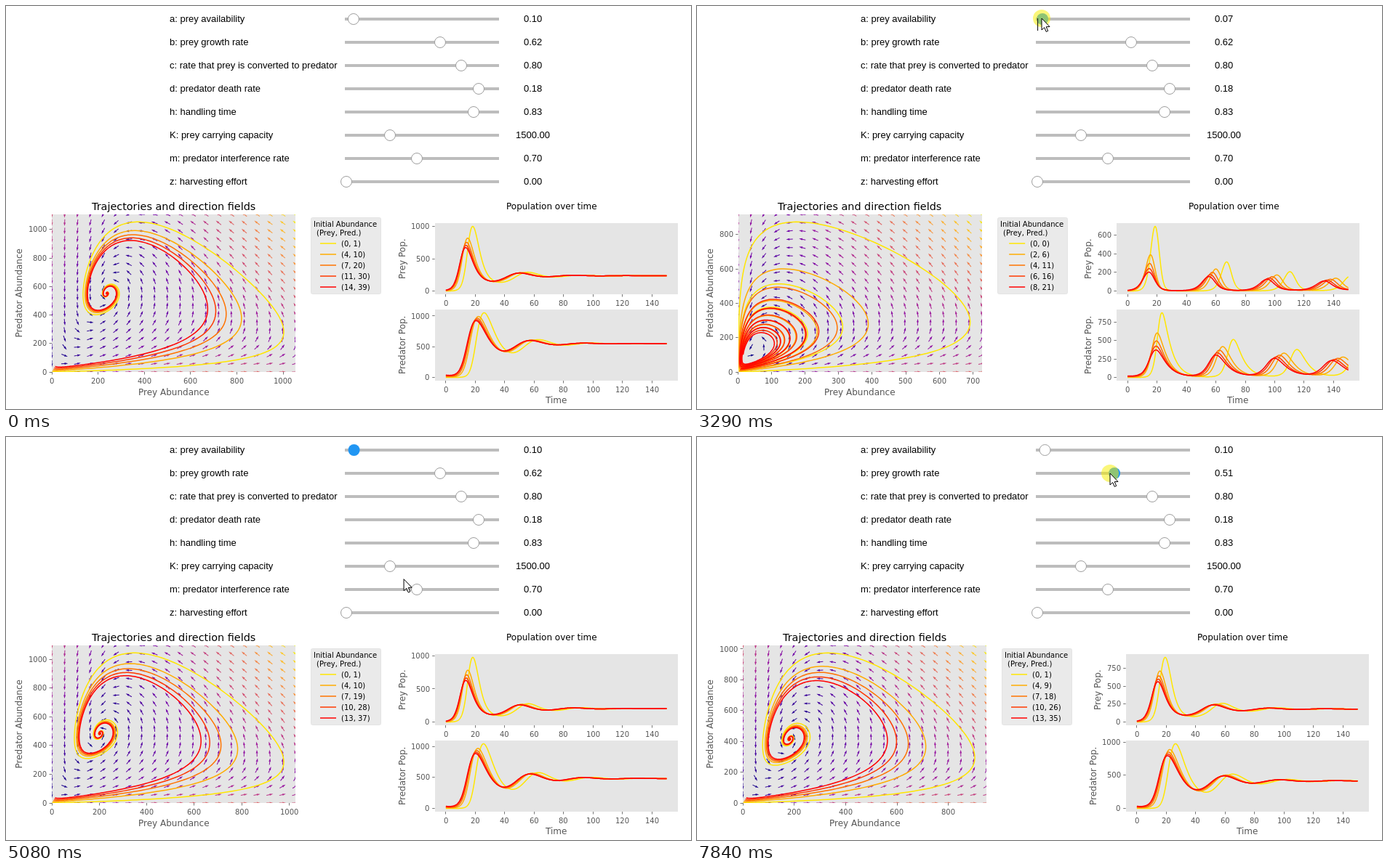
Recreate the animation shown at these times as an HTML page with a canvas. Size 942x555 px, loop 7990 ms.

```html
<!DOCTYPE html>
<html lang="en">
<head>
<meta charset="utf-8">
<title>Predator and prey</title>
<style>
html, body { margin: 0; width: 100%; height: 100%; overflow: hidden; background: #fff; }
canvas { display: block; }
</style>
</head>
<body>
<canvas id="stage" width="942" height="555"></canvas>
<script>
const ctx = document.getElementById('stage').getContext('2d');
const LOOP = 7990;
const SANS = '"DejaVu Sans", sans-serif';
const PANEL = '"Liberation Sans", Arial, sans-serif';
const GREY = '#555';
const PLASMA = ['0d0887', '46039f', '7201a8', '9c179e', 'bd3786', 'd8576b', 'ed7953', 'fb9f3a', 'fdca26', 'f0f921']
  .map(hex => [0, 2, 4].map(i => parseInt(hex.slice(i, i + 2), 16)));
const STARTS = [0.1, 1.325, 2.55, 3.775, 5];
const COLORS = [230, 172, 115, 57, 0].map(g => `rgb(255,${g},0)`);

// ---- model: logistic prey, predators that interfere with each other ----
const c = 0.8, d = 0.18, h = 0.83, K = 1500, m = 0.7;

function flow(n, p, a, b) {
  const eaten = a * n * p / (p ** m + a * h * n);
  return [b * n * (1 - n / K) - eaten, c * eaten - d * p];
}

function solve(a, b) {
  const n0 = d / (a * (c - d * h)), p0 = n0 * b * c / d, dt = 0.05;
  let nMax = 0, pMax = 0;
  const runs = STARTS.map(v => {
    let n = v * n0, p = v * p0;
    const label = `(${n.toFixed(0)}, ${p.toFixed(0)})`, pts = [];
    for (let i = 0; i <= 3000; i++) {
      if (i % 3 === 0) pts.push([i * dt, n, p]);
      nMax = Math.max(nMax, n);
      pMax = Math.max(pMax, p);
      const k1 = flow(n, p, a, b);
      const k2 = flow(n + k1[0] * dt / 2, p + k1[1] * dt / 2, a, b);
      const k3 = flow(n + k2[0] * dt / 2, p + k2[1] * dt / 2, a, b);
      const k4 = flow(n + k3[0] * dt, p + k3[1] * dt, a, b);
      n += dt / 6 * (k1[0] + 2 * k2[0] + 2 * k3[0] + k4[0]);
      p += dt / 6 * (k1[1] + 2 * k2[1] + 2 * k3[1] + k4[1]);
    }
    return { label, pts };
  });
  return { a, b, runs, nMax, pMax };
}

// from: first time of the plots; axes, curves: when the right side follows
const SCENES = [
  { from: 0, axes: 0, curves: 0, sys: solve(0.0966, 0.62) },
  { from: 1700, axes: 1950, curves: 1950, sys: solve(0.1803, 0.62) },
  { from: 4310, axes: 4510, curves: 4510, sys: solve(0.1032, 0.62) },
  { from: 6960, axes: 7010, curves: 7210, sys: solve(0.1032, 0.583) }
];

// ---- drawing helpers ----
// Text starts on whole pixels
function text(str, x, y, size, color = '#000', align = 0, font = SANS) {
  ctx.font = `${size}px ${font}`;
  ctx.fillStyle = color;
  ctx.fillText(str, Math.round(x - align * ctx.measureText(str).width), Math.round(y));
}
const CENTER = 0.5, RIGHT = 1;

function line(pts, color, width) {
  ctx.beginPath();
  pts.forEach(([x, y]) => ctx.lineTo(x, y));
  ctx.strokeStyle = color;
  ctx.lineWidth = width;
  ctx.lineJoin = 'round';
  ctx.stroke();
}

function disc(x, y, r, fill, stroke) {
  ctx.beginPath();
  ctx.arc(x, y, r, 0, 7);
  ctx.fillStyle = fill;
  ctx.fill();
  if (stroke) {
    ctx.strokeStyle = stroke;
    ctx.lineWidth = 1;
    ctx.stroke();
  }
}

function tickStep(range, bins) {
  const raw = range / bins, mag = 10 ** Math.floor(Math.log10(raw));
  return mag * [1, 2, 2.5, 5, 10].find(s => s * mag >= raw);
}

const snap = v => Math.floor(v) + 0.5;

// Draws the grey field with ticks and labels; returns the value-to-pixel maps
function axes({ x, y, w, h, xr, yr, bins, xEnd, yLabel }) {
  const px = v => x + (v - xr[0]) / (xr[1] - xr[0]) * w;
  const py = v => y + h - (v - yr[0]) / (yr[1] - yr[0]) * h;
  ctx.fillStyle = '#e5e5e5';
  ctx.fillRect(Math.round(x), y, w, h);
  const sx = tickStep(xr[1] - xr[0], 9), sy = tickStep(yr[1] - yr[0], bins);
  for (let v = 0; v <= xEnd; v += sx) {
    const tx = snap(px(v));
    line([[tx, y + h], [tx, y + h + 3.5]], GREY, 0.8);
    text(v, px(v), y + h + 15.5, 10, GREY, CENTER);
  }
  let top = 0;
  for (let v = 0; v <= yr[1]; v += sy) {
    const ty = snap(py(v));
    line([[x - 3.5, ty], [x, ty]], GREY, 0.8);
    text(v, x - 7, py(v) + 3.6, 10, GREY, RIGHT);
    top = v;
  }
  ctx.save();
  ctx.translate(Math.round(x - (top >= 1000 ? 41 : 34.6)), y + h / 2);
  ctx.rotate(-Math.PI / 2);
  text(yLabel, 0, 0, 12, GREY, CENTER);
  ctx.restore();
  return { px, py };
}

function clipped(x, y, w, h, draw) {
  ctx.save();
  ctx.beginPath();
  ctx.rect(x, y, w, h);
  ctx.clip();
  draw();
  ctx.restore();
}

function plasma(u) {
  const f = Math.min(u, 0.9999) * 9, i = Math.floor(f);
  return `rgb(${PLASMA[i].map((v, k) => Math.round(v + (PLASMA[i + 1][k] - v) * (f - i)))})`;
}

function arrow(x, y, angle, color) {
  const half = 4.65;
  ctx.save();
  ctx.translate(x, y);
  ctx.rotate(angle);
  ctx.beginPath();
  [[-half, -0.5], [half - 4.5, -0.5], [half - 5, -1.5], [half, 0],
    [half - 5, 1.5], [half - 4.5, 0.5], [-half, 0.5]].forEach(q => ctx.lineTo(...q));
  ctx.fillStyle = color;
  ctx.fill();
  ctx.restore();
}

// ---- plots ----
function phasePlot(sys, x) {
  const y = 287, w = 335, h = 217, nTop = sys.nMax * 1.05, pTop = sys.pMax * 1.05;
  const { px, py } = axes({ x, y, w, h, xr: [0, nTop], yr: [0, pTop], bins: 9, xEnd: nTop, yLabel: 'Predator Abundance' });
  clipped(Math.round(x), y, w, h, () => {
    const field = [];
    for (let i = 0; i < 20; i++) for (let j = 0; j < 20; j++) {
      if (i + j === 0) continue;
      const n = nTop * i / 19, p = pTop * j / 19, [dn, dp] = flow(n, p, sys.a, sys.b);
      field.push({ n, p, angle: Math.atan2(-dp, dn), speed: Math.hypot(dn, dp) });
    }
    const fastest = Math.max(...field.map(f => f.speed));
    field.forEach(f => arrow(px(f.n), py(f.p), f.angle, plasma(f.speed / fastest)));
    sys.runs.forEach((r, i) => line(r.pts.map(q => [px(q[1]), py(q[2])]), COLORS[i], 1.5));
  });
  text('Trajectories and direction fields', x + w / 2, 281, 14.4, '#000', CENTER);
  text('Prey Abundance', x + w / 2, 536, 12, GREY, CENTER);
}

function legend(sys, x) {
  ctx.beginPath();
  ctx.roundRect(x + 0.5, 291.5, 96, 105, 2);
  ctx.fillStyle = '#eaeaea';
  ctx.fill();
  ctx.strokeStyle = '#e0e0e0';
  ctx.lineWidth = 0.8;
  ctx.stroke();
  text('Initial Abundance', x + 4, 304, 10);
  text('(Prey, Pred.)', x + 7.5, 316, 10);
  // the entries are centred as a block
  const widest = Math.max(...sys.runs.map(r => ctx.measureText(r.label).width));
  const left = x + 47.3 - (29 + widest) / 2;
  sys.runs.forEach((r, i) => {
    const y = Math.round(327.3 + 14.8 * i);
    line([[left, y], [left + 22, y]], COLORS[i], 1.5);
    text(r.label, left + 29, y + 4, 10);
  });
}

function timePlot(sys, x, y, col, max, yLabel, curves) {
  const w = 334, h = 98;
  const { px, py } = axes({ x, y, w, h, xr: [-7.5, 157.5], yr: [-0.05 * max, 1.05 * max], bins: 4.05, xEnd: 150, yLabel });
  if (curves) clipped(x, y, w, h, () =>
    sys.runs.forEach((r, i) => line(r.pts.map(q => [px(q[0]), py(q[col])]), COLORS[i], 1.5)));
}

function plots(t) {
  const scene = SCENES.filter(s => t >= s.from).pop(), { sys } = scene;
  const digit = 6.4, left = sys.pMax * 1.05 < 1000 ? digit : 0;
  const right = Math.max(sys.nMax, sys.pMax) * 1.05 < 1000 ? digit : 0;
  phasePlot(sys, 63 - left);
  legend(sys, Math.round(419 - left));
  if (t < scene.axes) return;
  const x = 589.7 - left - right, curves = t >= scene.curves;
  timePlot(sys, x, 299, 1, sys.nMax, 'Prey Pop.', curves);
  timePlot(sys, x, 418, 2, sys.pMax, 'Predator Pop.', curves);
  text('Population over time', x + 161, 280, 12, '#000', CENTER);
  text('Time', x + 167, 547, 12, GREY, CENTER);
}

// ---- sliders and pointer ----
const A_KEYS = [[900, 0.0966], [1250, 0.1803], [2880, 0.1803], [3290, 0.0699], [3590, 0.0699], [3740, 0.1032]];
const B_KEYS = [[6290, 0.62], [6290, 0.583], [7580, 0.583], [7840, 0.51]];
const POINTER = [[50, 880, 474], [240, 554, 2], [390, 540, 4], [700, 482, 30], [850, 478, 17], [1250, 491, 17],
  [2110, 491, 17], [2450, 487, 17], [2880, 486, 17], [3290, 474, 17], [3590, 474, 17], [3740, 478, 17],
  [4760, 478, 17], [5080, 547, 196], [5530, 580, 62], [5890, 592, 55], [6090, 590, 49], [6290, 590, 49],
  [6710, 584, 50], [7430, 583, 49], [7580, 583, 49], [7840, 568, 50]];
const PRESSED = [[900, 1440], [2880, 4060], [6090, 6290], [7430, LOOP]];

function at(keys, t) {
  const i = keys.findIndex(k => k[0] > t);
  if (i === 0) return keys[0].slice(1);
  if (i < 0) return keys[keys.length - 1].slice(1);
  const p = keys[i - 1], q = keys[i], u = (t - p[0]) / (q[0] - p[0]);
  return p.slice(1).map((v, k) => v + (q[k + 1] - v) * u);
}

function sliders(t) {
  const [a] = at(A_KEYS, t), [b] = at(B_KEYS, t);
  const active = t < 900 ? -1 : t < 6090 ? 0 : 1;
  [
    ['a: prey availability', a, 468.8 + (a - 0.01) * 104.5],
    ['b: prey growth rate', b, 468 + b * 208],
    ['c: rate that prey is converted to predator', c, 626],
    ['d: predator death rate', d, 650],
    ['h: handling time', h, 643],
    ['K: prey carrying capacity', K, 528],
    ['m: predator interference rate', m, 565],
    ['z: harvesting effort', 0, 468]
  ].forEach(([label, value, x], i) => {
    const y = 18 + 32 * i;
    text(label, 225, y + 4, 13, '#000', 0, PANEL);
    text(value.toFixed(2), 724.5, y + 4, 13, '#000', CENTER, PANEL);
    ctx.fillStyle = '#bdbdbd';
    ctx.fillRect(466, y - 2, 212, 4);
    if (i === active) disc(x, y, 8, '#2196f3');
    else disc(x, y, 7.5, '#fff', '#9e9e9e');
  });
}

function pointer(t) {
  if (t < 50) return;
  const [x, y] = at(POINTER, t);
  if (PRESSED.some(([on, off]) => t >= on && t < off)) disc(x, y, 12, 'rgba(245,238,0,0.52)');
  if (t >= 2620 && t < 4760) line([[x - 5.5, 17], [x - 5.5, 34]], '#222', 1.2);
  ctx.beginPath();
  [[0, 0], [0, 16], [3.7, 12.6], [6.2, 18.4], [8.7, 17.3], [6.2, 11.7], [11, 11.5]]
    .forEach(([dx, dy]) => ctx.lineTo(x + dx, y + dy));
  ctx.closePath();
  ctx.fillStyle = '#fff';
  ctx.fill();
  ctx.strokeStyle = '#000';
  ctx.lineWidth = 1;
  ctx.stroke();
}

const start = performance.now();
function frame() {
  const t = (performance.now() - start) % LOOP;
  ctx.fillStyle = '#fff';
  ctx.fillRect(0, 0, 942, 555);
  sliders(t);
  plots(t);
  pointer(t);
  requestAnimationFrame(frame);
}
frame();
</script>
</body>
</html>
```
